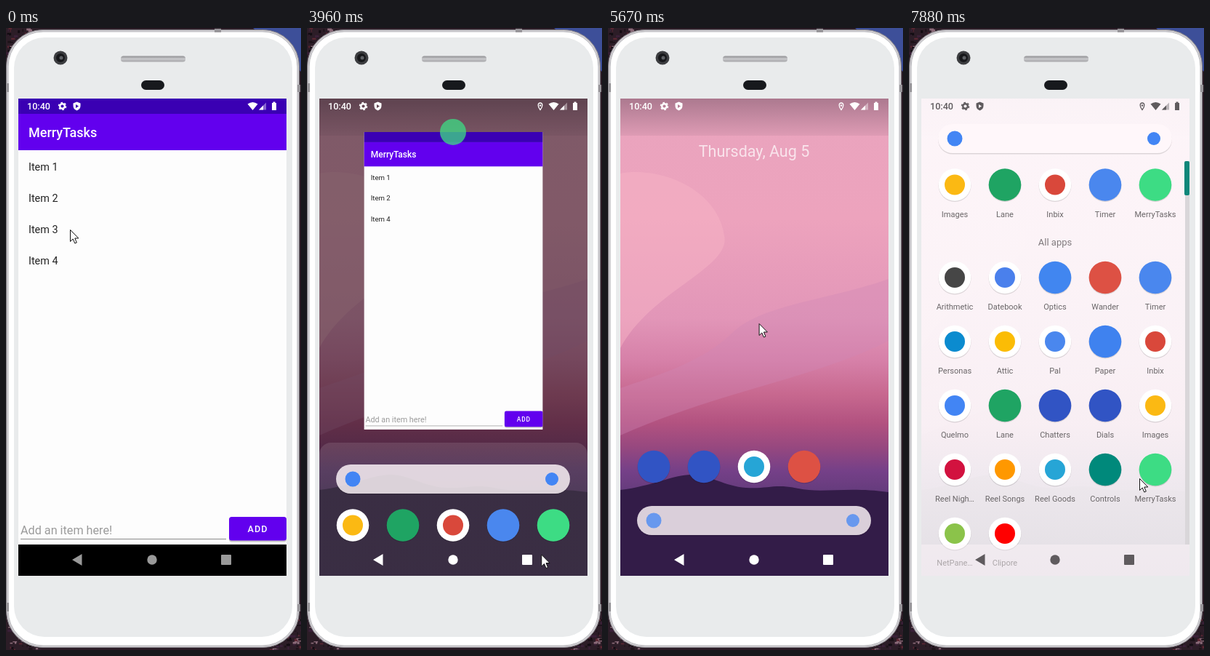
These frames come from a looping animation (406 px wide and 855 px high, 8000 ms). An HTML page:

```html
<!DOCTYPE html>
<html lang="en">
<head>
<meta charset="utf-8">
<title>Task list demo</title>
<style>
html, body { margin: 0; width: 100%; height: 100%; overflow: hidden; background: #241820; }
svg { display: block; width: 100vw; height: 100vh; font-family: Roboto, sans-serif; }
.mid { text-anchor: middle; }
.label { font-size: 11px; font-stretch: condensed; text-anchor: middle; fill: #6a6668; }
</style>
</head>
<body>
<svg viewBox="0 0 406 855">
  <defs>
    <clipPath id="screen"><rect x="17" y="97" width="369" height="656"/></clipPath>
    <clipPath id="page"><rect x="17" y="97" width="369" height="613"/></clipPath>
    <linearGradient id="sky" x1="0" y1="0" x2="0" y2="1">
      <stop offset="0" stop-color="#e9a4be"/>
      <stop offset=".25" stop-color="#eda3bd"/>
      <stop offset=".46" stop-color="#e296b8"/>
      <stop offset=".55" stop-color="#d680a8"/>
      <stop offset=".62" stop-color="#c7688f"/>
      <stop offset=".68" stop-color="#b25280"/>
      <stop offset=".73" stop-color="#97487f"/>
      <stop offset=".78" stop-color="#754088"/>
      <stop offset=".84" stop-color="#5f3a78"/>
    </linearGradient>
    <linearGradient id="shade" x1="0" y1="0" x2="0" y2="1">
      <stop offset="0" stop-color="#503848" stop-opacity=".4"/>
      <stop offset="1" stop-color="#503848" stop-opacity=".08"/>
    </linearGradient>
    <linearGradient id="paper" x1="0" y1="0" x2="0" y2="1">
      <stop offset="0" stop-color="#fef8fb"/>
      <stop offset=".6" stop-color="#fbf5f8"/>
      <stop offset=".85" stop-color="#ebe8ec"/>
    </linearGradient>
    <linearGradient id="slot" x1="0" y1="0" x2="0" y2="1">
      <stop offset="0" stop-color="#8f8f92"/>
      <stop offset=".5" stop-color="#c8c8cb"/>
      <stop offset="1" stop-color="#a5a5a8"/>
    </linearGradient>
  </defs>

  <!-- backdrop and device -->
  <rect width="406" height="855" fill="#2c1d27"/>
  <path d="M340 0H406V60Z" fill="#3d4f99"/>
  <g id="specks"></g>
  <rect x=".5" y="2.500" width="403" height="849" rx="50" fill="#d0ced2" stroke="#858288"/>
  <rect x="3" y="5" width="398" height="844" rx="48" fill="#fff" stroke="#b9b9bd"/>
  <rect x="11" y="13" width="383" height="824" rx="42" fill="#e9ebec"/>
  <path d="M0 76h4v12H0M401 78h4v10h-4M0 790h4v12H0M401 792h4v10h-4M287 1h9v5h-9" fill="#98969a"/>
  <circle cx="75" cy="41" r="9.500" fill="#3c3d40"/>
  <circle cx="75" cy="41" r="6" fill="#17181b"/>
  <circle cx="76" cy="41" r="2.500" fill="#5d6064"/>
  <rect x="158" y="38.500" width="89" height="8" rx="3.500" fill="url(#slot)"/>
  <rect x="186" y="72" width="32" height="13" rx="6.500" fill="#17191d"/>

  <g clip-path="url(#screen)">
    <!-- wallpaper -->
    <rect x="17" y="97" width="369" height="656" fill="url(#sky)"/>
    <path d="M17 200C70 190 150 220 160 285C170 330 60 360 17 440Z" fill="#f7b3c6" opacity=".5"/>
    <path d="M386 345C300 375 210 380 170 420C130 460 60 480 17 495V560C150 500 290 480 386 430Z" fill="#cf87b4" opacity=".35"/>
    <path d="M17 635C60 630 90 614 115 614S160 630 190 632S230 626 262 633S330 630 386 638V753H17Z" fill="#331c48"/>
    <rect x="17" y="97" width="369" height="51" fill="url(#shade)"/>
    <rect id="scrim" x="17" y="97" width="369" height="656" fill="#0c0a0c"/>

    <!-- launcher -->
    <text id="date" class="mid" x="201" font-size="21.500" fill="#fff" fill-opacity=".7">Thursday, Aug 5</text>
    <g id="home"></g>
    <rect id="sheet" x="17" width="369" height="780" rx="16" fill="url(#paper)"/>
    <g id="drawer">
      <g id="pill">
        <rect x="40" y="133.500" width="322" height="40" rx="20" fill="#000" opacity=".13"/>
        <rect x="40" y="132" width="322" height="40" rx="20" fill="#fff7fa"/>
      </g>
      <g id="marks" fill="#4285f4">
        <circle cx="63" cy="152" r="10.500"/>
        <circle cx="337" cy="152" r="9"/>
      </g>
      <g id="dock"></g>
      <g id="rows"><text class="mid" x="201" y="299" font-size="13" fill="#807b7e">All apps</text></g>
    </g>
    <rect id="rail" x="380" width="6" fill="#d9d6d9"/>
    <rect id="thumb" x="379" width="7" height="47" rx="2" fill="#0f877a"/>
    <rect id="strip" x="17" y="710" width="369" height="43" fill="#fdf4f8"/>
    <g id="bar"></g>

    <!-- task list app -->
    <g id="app">
      <g clip-path="url(#page)">
        <rect x="17" y="97" width="369" height="613" fill="#fdfdfd"/>
        <rect x="17" y="118" width="369" height="50" fill="#6200ee"/>
        <rect x="17" y="97" width="369" height="21" fill="#3a00b3"/>
        <text x="31" y="150" font-size="18" font-weight="500" fill="#fff">MerryTasks</text>
        <g id="items" font-size="14.400" fill="#232323"></g>
        <text x="20" y="695.500" font-size="16.200" fill="#9b9b9b">Add an item here!</text>
        <path d="M20 702.500H303" stroke="#8b8b8b"/>
        <rect x="307" y="673.500" width="79" height="33" rx="3.500" fill="#000" opacity=".22"/>
        <rect x="307" y="672" width="79" height="32.500" rx="3.500" fill="#6200ee"/>
        <text class="mid" x="346.500" y="693" font-size="12.600" font-weight="500" letter-spacing="1.100" fill="#fff">ADD</text>
      </g>
      <g id="appBar" fill="#fff" color="#fff"></g>
    </g>
    <circle id="badge" cx="201" r="18" fill="#3ddc84"/>
    <g id="toast">
      <rect x="128" y="644" width="147" height="44" rx="22" fill="#eee"/>
      <text class="mid" x="201" y="671" font-size="12.600" fill="#333">Item was removed</text>
    </g>

    <rect id="navBack" x="17" y="710" width="369" height="43"/>
    <rect id="ripple" x="287" y="710" width="32" height="43" rx="14" fill="#1d1d1d"/>
    <g id="nav">
      <path d="M91 731L104.500 723V739Z"/>
      <circle cx="201" cy="731" r="6.700"/>
      <rect x="296" y="724" width="14" height="14" rx="1"/>
    </g>
  </g>
  <path id="mouse" d="M.5 .5V16.500L4.200 13L6.800 19L9.300 18L6.800 12H11.800Z" fill="#fff" stroke="#111"/>
</svg>

<script>
const LOOP = 8000, STEP = 7880 / 60;
const OPEN = 152, RECENT = 606, HOME = 677;       // search box height in each view
const CARD = 0.645, CARD_TOP = 146;

const $ = id => document.getElementById(id);
const clamp = v => Math.max(0, Math.min(1, v));
const mix = (a, b, k) => a + (b - a) * k;
const ramp = (n, from, to) => clamp((n - from) / (to - from));
const easeOut = (k, power) => 1 - (1 - k) ** power;
const smooth = k => k * k * (3 - 2 * k);

const set = (id, attrs) => {
  for (const name in attrs) $(id).setAttribute(name, attrs[name]);
};
const fade = (id, v) => set(id, { opacity: clamp(v) });
const move = (id, x, y) => set(id, { transform: `translate(${x} ${y})` });

// [name, colour, mark sits on a white disc]
const apps = {
  images: ["Images", "#fbb913", 1], lane: ["Lane", "#1fa463"],
  mail: ["Inbix", "#d9483b", 1], timer: ["Timer", "#4a87ee"],
  tasks: ["MerryTasks", "#3ddc84"], sums: ["Arithmetic", "#464646", 1],
  dates: ["Datebook", "#4a80ec", 1], optics: ["Optics", "#4186f0"],
  wander: ["Wander", "#dd5144"], people: ["Personas", "#0b8bcf", 1],
  attic: ["Attic", "#fbbc05", 1], pal: ["Pal", "#4a87ee", 1],
  paper: ["Paper", "#3f82ef"], find: ["Quelmo", "#4285f4", 1],
  chat: ["Chatters", "#3154c4"], dial: ["Dials", "#3154c4"],
  reel: ["Reel Nigh…", "#d2123f", 1], songs: ["Reel Songs", "#ff9800", 1],
  goods: ["Reel Goods", "#26a5d6", 1], controls: ["Controls", "#00897b"],
  pane: ["NetPane…", "#8bc34a", 1], clips: ["Clipore", "#f00", 1]
};
const first = "images lane mail timer tasks";
const grid = [
  "sums dates optics wander timer", "people attic pal paper mail",
  "find lane chat dial images", "reel songs goods controls tasks", "pane clips"
];

const disc = (x, y, r, fill) => `<circle cx="${x}" cy="${y}" r="${r}" fill="${fill}"/>`;
const eachApp = (keys, make) => keys.split(" ")
  .map((key, i) => make(apps[key], 63 + 69 * i)).join("");
const icons = (keys, y) => eachApp(keys, ([, color, backed], x) =>
  disc(x, y + 1, 22.5, "#0002") + disc(x, y, 22.3, backed ? "#fff" : color) +
  (backed ? disc(x, y, 14, color) : ""));
const labels = (keys, y) => eachApp(keys, ([name], x) =>
  `<text class="label" x="${x}" y="${y}">${name}</text>`);

$("home").innerHTML = icons("dial chat goods wander", 0);
$("dock").innerHTML = icons(first, 215.5);
$("rows").innerHTML += labels(first, 260) +
  grid.map((keys, i) => icons(keys, 343 + 88 * i) + labels(keys, 387 + 88 * i)).join("");
$("items").innerHTML = [1, 2, 3, 4]
  .map(n => `<text id="item${n}" x="31" y="${152.5 + 43 * n}">Item ${n}</text>`).join("");

const status = extra => `
  <text x="29" y="112" font-size="12.600" font-weight="500">10:40</text>
  <circle cx="77.500" cy="107.500" r="3.300" fill="none" stroke="currentColor" stroke-width="2.400"/>
  <circle cx="77.500" cy="107.500" r="5" fill="none" stroke="currentColor" stroke-width="1.600" stroke-dasharray="2.600"/>
  <path fill-rule="evenodd" d="M97.500 101.500L102.500 103.500V107Q102.500 111.500 97.500 113.500Q92.500 111.500 92.500 107V103.500ZM96 105V110L100 107.500Z"/>
  <path d="M332.500 104.500Q339.500 99.500 346.500 104.500L339.500 113Z"/>
  <path d="M358 102.500V112.500H348Z" opacity=".4"/><path d="M354 106.500V112.500H348Z"/>
  <path d="M366 103H367.500V101.500H370.500V103H372V113H366Z"/>${extra}`;
const pin = `
  <path fill="none" stroke="currentColor" stroke-width="1.300" d="M321 112.500C317 108 317.500 103 321 103S325 108 321 112.500Z"/>
  <circle cx="321" cy="106.500" r="1.200"/>`;
$("bar").innerHTML = status(pin);
$("appBar").innerHTML = status("");

// Rough foliage showing behind the device corners
let seed = 7;
const rand = () => (seed = seed * 16807 % 2147483647) / 2147483647;
const tones = ["#120c12", "#5c2733", "#8a6a78", "#3a2038", "#1c1218"];
$("specks").innerHTML = Array.from({ length: 220 }, (_, i) => {
  const x = i % 2 ? 406 - rand() * 45 : rand() * 45;
  const y = i % 4 < 2 || i % 2 ? 855 - rand() * 50 : rand() * 40;
  return `<rect x="${x}" y="${y}" width="${1 + rand() * 6}" height="${1 + rand() * 3}" fill="${tones[i % 5]}"/>`;
}).join("");

// Pointer way points: [step, x, y]
const route = [
  [14, 88, 277], [16, 93, 314], [18, 106, 382], [20, 203, 543], [22, 291, 681], [25, 301, 747],
  [27, 308, 740], [31, 327, 718], [33, 212, 430], [35, 203, 220], [38, 225, 131], [40, 232, 199],
  [41, 226, 306], [46, 180, 556], [48, 167, 367], [52, 212, 150], [55, 232, 385], [60, 317, 619]
];
function pointer(n) {
  const i = Math.max(1, route.findIndex(p => p[0] >= n));
  const b = n > route.at(-1)[0] ? route.at(-1) : route[i];
  const a = route[i - 1], k = ramp(n, a[0], b[0]);
  move("mouse", mix(a[1], b[1], k), mix(a[2], b[2], k));
}

function drawApp(n, shrink) {
  const scale = mix(1, CARD, shrink);
  const y = mix(97, CARD_TOP, shrink) - 45 * Math.max(0, n - 33) ** 2;
  set("app", {
    transform: `translate(${201.5 - 184.5 * scale} ${y}) scale(${scale}) translate(-17 -97)`,
    visibility: n < 36 ? "visible" : "hidden"
  });
  fade("appBar", 1 - shrink * 2);
  set("badge", { cy: y, opacity: n < 36 ? clamp(shrink * 4 - 3) : 0 });
  fade("item3", 1 - ramp(n, 0, 1.7));
  move("item4", 0, -43 * ramp(n, 1, 3));
  fade("toast", ramp(n, 0, 4) - ramp(n, 15, 19));
}

function drawLauncher(n, shrink) {
  const leave = ramp(n, 36, 40);
  const open = smooth(ramp(n, 46.55, 52));
  const dark = 1 - leave;
  const s = mix(mix(mix(830, RECENT, shrink), HOME, easeOut(leave, 2.5)), OPEN, open);
  const lift = (HOME - s) / (HOME - OPEN);

  fade("scrim", dark * .48);
  set("date", { y: 174.5 - 14 * (665 - s) / 79, opacity: leave * clamp(1 - lift * 1.2) });
  move("home", 0, s - 74);
  fade("home", leave ** 1.4 * (1 - lift * 2));
  set("sheet", { y: s - 50 - 25 * open ** 4, opacity: clamp(Math.min(.96, lift * 1.8) * (1 - .4 * dark)) });
  move("drawer", 0, s - OPEN);
  fade("pill", .82 - .27 * clamp(open * 6) + .45 * open ** 2);
  fade("marks", Math.max(dark, .75 + open / 4));
  fade("dock", Math.max(Math.sqrt(dark), open * 1.7));
  fade("rows", (open - .15) * 3);
  set("rail", { y: s + 31, height: Math.max(0, 679 - s), opacity: open ** 2 });
  set("thumb", { y: s + 31, opacity: open });
  fade("strip", open ** 3 * .45);
  const ink = open > .75 ? "#5f5b5e" : "#fff";
  set("bar", { fill: ink, color: ink });
  return ink;
}

function draw(time) {
  const n = Math.floor(time / STEP + .2);
  const inApp = n <= 27;
  const shrink = easeOut(ramp(n, 27, 31), 2);
  drawApp(n, shrink);
  const ink = drawLauncher(n, shrink);
  fade("navBack", inApp ? 1 : 0);
  fade("ripple", inApp ? ramp(n, 24, 26) : 0);
  set("nav", { fill: inApp ? "#999" : ink });
  pointer(n);
}

const start = performance.now();
function loop() {
  draw((performance.now() - start) % LOOP);
  requestAnimationFrame(loop);
}
loop();
</script>
</body>
</html>
```
